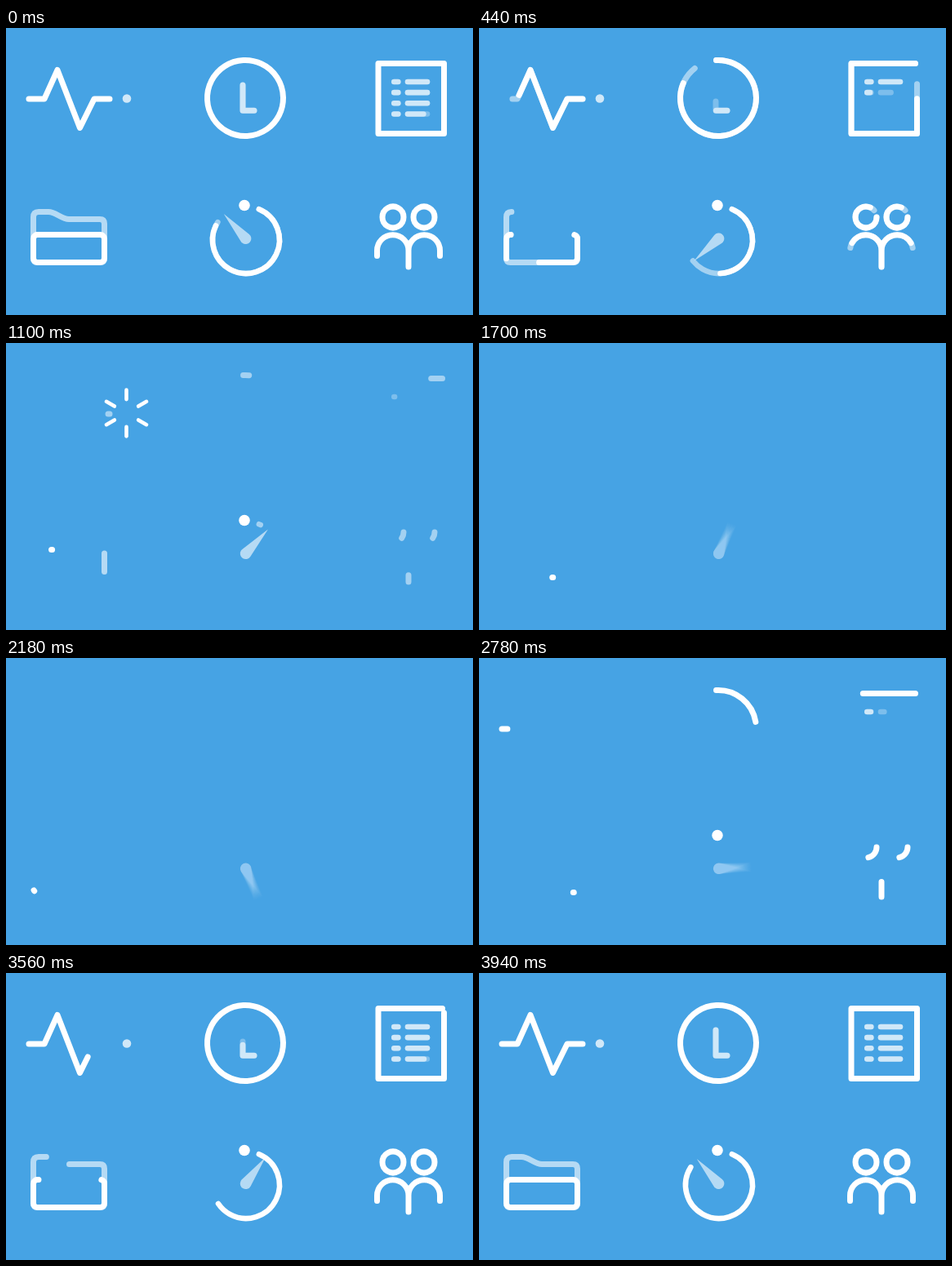
Recreate the animation shown at these times as an HTML page with a canvas. Size 572x352 px, loop 5.98 s.

```html
<!DOCTYPE html>
<html lang="en">
<head>
<meta charset="utf-8">
<title>Icon loop</title>
<style>
html, body { margin: 0; width: 100%; height: 100%; overflow: hidden; background: #46a3e4; }
canvas { display: block; }
</style>
</head>
<body>
<canvas id="stage" width="572" height="352"></canvas>
<script>
const g = document.getElementById('stage').getContext('2d');
const LOOP = 5980, STEP = 20, TURN = 1900;
const rad = d => d * Math.PI / 180;
const clamp = x => Math.min(1, Math.max(0, x));
const ease = (t, a, b) => (1 - Math.cos(Math.PI * clamp((t - a) / (b - a)))) / 2;
const easeOut = (t, a, b) => 1 - (1 - clamp((t - a) / (b - a))) ** 2;

// Visible share: hidden over [a, b], shown again over [c, d]
const shown = (t, a, b, c, d) => t < TURN ? 1 - ease(t, a, b) : ease(t, c, d);

// Smooth curve through [time, value] points, at rest at both ends
function track(keys, t) {
  const n = keys.length - 1;
  if (t <= keys[0][0]) return keys[0][1];
  if (t >= keys[n][0]) return keys[n][1];
  let i = 0;
  while (t >= keys[i + 1][0]) i++;
  const slope = k => k === 0 || k === n ? 0
    : (keys[k + 1][1] - keys[k - 1][1]) / (keys[k + 1][0] - keys[k - 1][0]);
  const [t0, y0] = keys[i], [t1, y1] = keys[i + 1];
  const h = t1 - t0, s = (t - t0) / h, s2 = s * s, s3 = s2 * s;
  return y0 * (2 * s3 - 3 * s2 + 1) + y1 * (3 * s2 - 2 * s3)
    + h * (slope(i) * (s3 - 2 * s2 + s) + slope(i + 1) * (s3 - s2));
}

// The twin is a second subpath of the same length
function shape(d, twin = '') {
  const el = document.createElementNS('http://www.w3.org/2000/svg', 'path');
  el.setAttribute('d', d);
  return { path: new Path2D(d + twin), len: el.getTotalLength() };
}

function arc(cx, cy, r, start, sweep) {
  const at = a => `${cx + r * Math.cos(rad(a))} ${cy + r * Math.sin(rad(a))}`;
  const third = k => `A${r} ${r} 0 0 1 ${at(start + sweep * k / 3)}`;
  return `M${at(start)}${third(1)}${third(2)}${third(3)}`;
}

const pulse = shape('M28 87H47L63 51.5L90.5 122.5L108 87H127');
const clock = shape(arc(293, 86, 46.5, -93, 360));
const hands = shape('M290 70V101.3H304');
const sheet = shape('M536.5 43.5V129.5H456V43.5H534.5');
const back = shape('M120.5 258V240Q120.5 234.5 115 234.5H77C68 234.5 61 225.5 52 225.5H40' +
  'Q33.5 225.5 33.5 232V282.5Q33.5 287.5 38.5 287.5H115.5Q120.5 287.5 120.5 282.5Z');
const front = shape('M38.5 253.5H115.5A5 5 0 0 1 120.5 258.5V282.5A5 5 0 0 1 115.5 287.5' +
  'H38.5A5 5 0 0 1 33.5 282.5V258.5A5 5 0 0 1 38.5 253.5Z');
const ring = shape(arc(294, 260, 41, -67.2, 279.4));
const heads = shape(arc(474, 232, 13, 0, 360), arc(512, 232, 13, 0, 360));
const bodies = shape('M493 293V273A19.25 19.25 0 0 0 454.5 273V279.5',
  'M493 293V273A19.25 19.25 0 0 1 531.5 273V279.5');

const white = a => `rgba(255,255,255,${a})`;

function disc(x, y, r, alpha = 1) {
  if (r <= 0) return;
  g.fillStyle = white(alpha);
  g.beginPath();
  g.arc(x, y, r, 0, 2 * Math.PI);
  g.fill();
}

function line(x0, y0, x1, y1) {
  g.beginPath();
  g.moveTo(x0, y0);
  g.lineTo(x1, y1);
  g.stroke();
}

// Strokes the share [a, b] of a shape; the range may wrap round
function part(s, a, b, alpha = 1) {
  const size = b - a;
  if (size < 0.002) return;
  g.strokeStyle = white(alpha);
  if (size >= 0.999) {
    g.setLineDash([]);
    g.stroke(s.path);
    return;
  }
  a -= Math.floor(a);
  b = a + size;
  if (b > 1.0001) {
    part(s, 0, b - 1, alpha);
    b = 1;
  }
  g.setLineDash([(b - a) * s.len, 2 * s.len]);
  g.lineDashOffset = -a * s.len;
  g.stroke(s.path);
  g.setLineDash([]);
}

const side = (s, v, flip, alpha) => flip ? part(s, 1 - v, 1, alpha) : part(s, 0, v, alpha);

// Solid stroke with a fainter, longer trail
function trail(s, solid, faint, flip) {
  if (faint > solid) side(s, faint, flip, 0.5);
  side(s, solid, flip, 1);
}

function drawPulse(t) {
  const back = t < TURN;
  let v = shown(t, 249, 1079, 2620, 3940);
  if (t >= 2390) v = Math.max(v, 0.004);
  trail(pulse, v, back ? 1 - ease(t, 297, 1155) : v, back);

  if (back) {
    disc(148, 86.5, 5.3 * (1 - ease(t, 850, 960)), 0.75);
  } else {
    g.save();
    g.beginPath();
    g.rect(140, 92 - 11 * ease(t, 2960, 3560), 16, 12);
    g.clip();
    disc(148, 86.5, 5.3, 0.75);
    g.restore();
  }

  const outer = 41 * easeOut(t, 900, 1350), inner = 41 * easeOut(t, 995, 1445);
  if (outer - inner < 0.2) return;
  g.lineWidth = 4.6;
  g.strokeStyle = white(1);
  for (let k = 0; k < 6; k++) {
    const c = Math.cos(rad(30 + 60 * k)), s = Math.sin(rad(30 + 60 * k));
    line(147.5 + inner * c, 86 + inner * s, 147.5 + outer * c, 86 + outer * s);
  }
  g.lineWidth = 7;
}

function drawClock(t) {
  const v = shown(t, 189, 1089, 2400, 3590);
  trail(clock, v, t < TURN ? 1 - ease(t, 245, 1196) : v);
  side(hands, shown(t, 70, 870, 2930, 3940), true, 0.3);
  side(hands, shown(t, 0, 697, 3075, 3940), true, 0.64);
}

function drawRows(v, alpha) {
  if (v < 0.002) return;
  let left = v * 116;
  g.strokeStyle = white(alpha);
  for (let row = 0; row < 4; row++) {
    for (const [x, w] of [[475.3, 5], [492, 24]]) {
      if (left <= 0) return;
      const y = 66 + 13.15 * row;
      line(x, y, x + Math.max(0.1, Math.min(w, left)), y);
      left -= w;
    }
  }
}

function drawSheet(t) {
  const v = shown(t, 240, 1090, 2420, 3660);
  trail(sheet, v, t < TURN ? 1 - ease(t, 270, 1225) : v, true);
  g.lineWidth = 6.6;
  drawRows(t < TURN ? 1 - easeOut(t, 0, 1200) : ease(t, 2600, 3584), 0.3);
  drawRows(t < TURN ? 1 - easeOut(t, -20, 960) : ease(t, 2650, 3684), 0.64);
  g.lineWidth = 7;
}

const RUN = [[440, 234], [1100, 251], [1700, 375], [2180, 431.4], [3100, 623.5]];

function drawFolder(t) {
  if (t < TURN) {
    part(back, clamp(t / 1200), 1, 0.6);
  } else {
    const half = ease(t, 2850, 3750) / 2, mid = 220 / 282;
    part(back, mid - half, mid + half, 0.6);
  }

  const L = front.len, head = track(RUN, t);
  if (t < 1100) {
    part(front, 158.2 * ease(t, 0, 885) / L, 158.2 / L);
    const tail = 158.2 + 92.8 * ease(t, 0, 930);
    part(front, Math.min(tail, head - 1) / L, head / L);
  } else {
    const half = Math.max(0.5 / L, ease(t, 2980, 3930) / 2);
    part(front, head / L - half, head / L + half);
  }
}

const SPIN = [[0, 0], [440, 90.5], [1100, 276], [1700, 654.5],
  [2180, 1241.5], [3260, 1943.5], [3940, 2160]];

function drawNeedle(t) {
  const blur = ease(t, 1150, 1600) * (1 - ease(t, 2700, 3600));
  const n = blur > 0.01 ? 14 : 1, fan = 16 * blur;
  const alpha = 0.6 - 0.22 * blur, edge = Math.acos(6.8 / 40.5);
  g.fillStyle = white(1 - (1 - alpha) ** (1 / n));
  for (let i = 0; i < n; i++) {
    g.save();
    g.translate(293.6, 258.3);
    g.rotate(rad(228.5 - track(SPIN, t) + (n > 1 ? fan * (i / (n - 1) - 0.5) : 0)));
    g.beginPath();
    g.arc(0, 0, 6.8, edge, 2 * Math.PI - edge);
    g.lineTo(40.5, 0);
    g.fill();
    g.restore();
  }
}

function drawTimer(t) {
  const v = shown(t, -126, 1090, 2770, 3940);
  g.lineWidth = 6.6;
  trail(ring, v, t < TURN ? 1 - ease(t, 69, 1171) : v);
  g.lineWidth = 7;
  disc(292, 217.5, 6.8 * shown(t, 1250, 1450, 2500, 2800));
  drawNeedle(t);
}

const LEAVE = [[200, 0], [440, 0.12], [1100, 0.905], [1210, 1]];

function drawPeople(t) {
  const v = shown(t, 192, 1052, 2420, 3600);
  const faint = t < TURN ? 1 - track(LEAVE, t) : v;
  trail(heads, v, faint);
  trail(bodies, v, faint);
}

function frame() {
  const t = Math.floor((performance.now() - start) % LOOP / STEP) * STEP;
  g.fillStyle = '#46a3e4';
  g.fillRect(0, 0, 572, 352);
  g.lineWidth = 7;
  g.lineCap = g.lineJoin = 'round';
  for (const draw of [drawPulse, drawClock, drawSheet, drawFolder, drawTimer, drawPeople]) draw(t);
  requestAnimationFrame(frame);
}

const start = performance.now();
frame();
</script>
</body>
</html>
```
